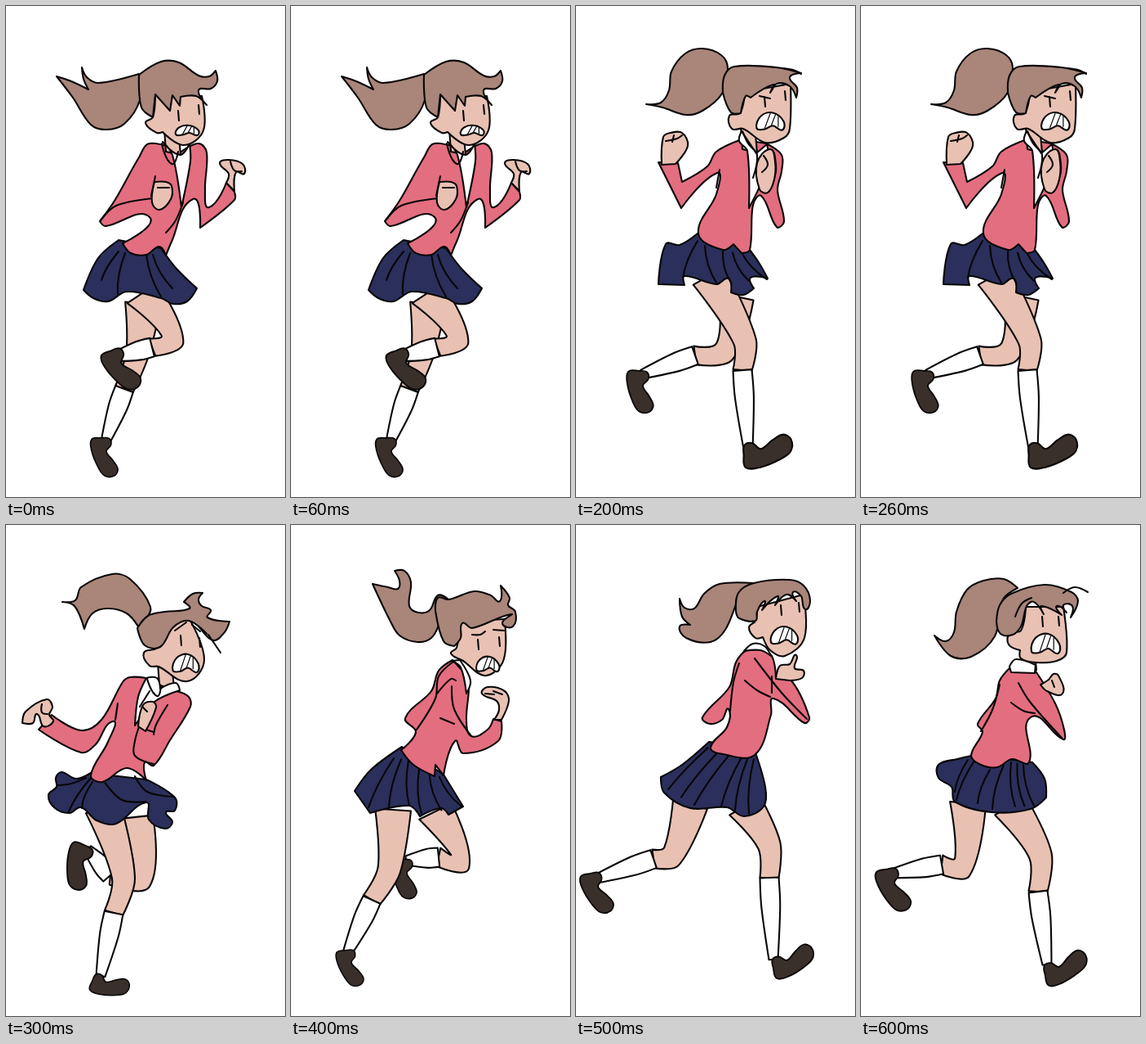
Animation, 342 px wide and 600 px high, one loop 700 ms. Source, as an HTML page with a canvas:

```html
<!DOCTYPE html>
<html lang="en">
<head>
<meta charset="utf-8">
<title>Running girl</title>
<style>
html, body { margin: 0; height: 100%; overflow: hidden; background: #fff; }
canvas { display: block; }
</style>
</head>
<body>
<canvas id="stage" width="342" height="600"></canvas>
<script>
const ctx = document.getElementById('stage').getContext('2d');
const STEP = 100;

// "x,y" pairs; a trailing "!" marks a sharp corner
const parse = text => text.split(' ').map(s => {
  const [x, y] = s.split(',').map(parseFloat);
  return { x, y, sharp: s.endsWith('!') };
});
const dist = (a, b) => Math.hypot(b.x - a.x, b.y - a.y);

function trace(pts, closed) {
  const n = pts.length, at = i => pts[(i + n) % n];
  // Control point beside point i on the way to its neighbour j
  const handle = (i, j) => {
    const p = at(i), a = at(i - 1), b = at(i + 1);
    if (p.sharp || (!closed && (i === 0 || i === n - 1))) return p;
    const k = (j - i) * dist(p, at(j)) / 3 / (dist(a, b) || 1);
    return { x: p.x + (b.x - a.x) * k, y: p.y + (b.y - a.y) * k };
  };
  ctx.beginPath();
  ctx.moveTo(pts[0].x, pts[0].y);
  for (let i = 0; i < (closed ? n : n - 1); i++) {
    const c = handle(i, i + 1), d = handle(i + 1, i), p = at(i + 1);
    ctx.bezierCurveTo(c.x, c.y, d.x, d.y, p.x, p.y);
  }
  if (closed) ctx.closePath();
}

const paint = color => shape => {
  trace(typeof shape === 'string' ? parse(shape) : shape, true);
  ctx.fillStyle = color;
  ctx.fill();
  ctx.stroke();
};
const hair = paint('#a9857a'), skin = paint('#e8c1b3'), red = paint('#e36e7f');
const navy = paint('#2a2f5b'), white = paint('#fff'), brown = paint('#3a302b');

const ink = (...lines) => lines.forEach(text => {
  trace(parse(text), false);
  ctx.stroke();
});

// Outline around a centre line with a width at each joint
function limb(joints, widths) {
  const left = [], right = [];
  joints.forEach((p, i) => {
    const a = joints[i - 1] || p, b = joints[i + 1] || p;
    const d1 = dist(a, p) || 1, d2 = dist(p, b) || 1;
    const dx = (p.x - a.x) / d1 + (b.x - p.x) / d2, dy = (p.y - a.y) / d1 + (b.y - p.y) / d2;
    const k = widths[i] / 2 / Math.hypot(dx, dy), sharp = a === p || b === p;
    left.push({ x: p.x + dy * k, y: p.y - dx * k, sharp });
    right.unshift({ x: p.x - dy * k, y: p.y + dx * k, sharp });
  });
  return left.concat(right);
}

// Hip, knee, sock top, ankle
function leg(text) {
  const [hip, knee, top, ankle] = parse(text);
  const calf = { x: top.x * .65 + ankle.x * .35, y: top.y * .65 + ankle.y * .35 };
  skin(limb([hip, knee, top], [44, 28, 23]));
  white(limb([top, calf, ankle], [23, 23, 11]));
}

function shoe(x, y, deg, size) {
  ctx.save();
  ctx.translate(x, y);
  ctx.rotate(deg * Math.PI / 180);
  ctx.scale(size, size);
  brown('-4,-5 -9,6 -12,21 5,27 32,26 47,21 52,8 45,-1 30,1 13,6 6,-4');
  ctx.restore();
}

const neck = (x, y) => skin([[0, 0], [18, 10], [20, 32], [2, 28]].map(([a, b]) => ({ x: x + a, y: y + b, sharp: true })));

// Pleats running from the waist a-b to the hem c-d
function pleats(count, text) {
  const [a, b, c, d] = parse(text);
  for (let i = 0; i < count; i++) {
    const t = count > 1 ? i / (count - 1) : 0, mix = (p, q) => p + (q - p) * t;
    const x = mix(a.x, b.x), y = mix(a.y, b.y), u = mix(c.x, d.x), v = mix(c.y, d.y);
    ctx.beginPath();
    ctx.moveTo(x, y);
    ctx.quadraticCurveTo((x + u) / 2 - 6, (y + v) / 2 + 2, u, v);
    ctx.stroke();
  }
}

const eyes = (x, y, u, v) => ink(`${x},${y} ${x + 1},${y + 12}`, `${u},${v} ${u + 1},${v + 11}`);

function mouth(x, y, w, h) {
  const put = text => parse(text).map(p => ({ x: x + p.x * w, y: y + p.y * h }));
  white(put('-.5,.4 -.35,-.3 .1,-.5 .5,0 .45,.5 .1,.25 -.2,.45'));
  ctx.lineWidth = 1.2;
  for (const tooth of ['-.2,.4 0,-.45', '.05,.2 .2,-.4', '.3,.3 .3,-.3']) {
    trace(put(tooth), false);
    ctx.stroke();
  }
  ctx.lineWidth = 2.1;
}

function hop() {
  leg('168,364 161,425 145,468 122,532');
  shoe(124, 533, 70, .8);
  leg('167,351 204,407 179,417 132,429');
  shoe(138, 424, 50, .9);
  navy('138,286! 113,308 95,347! 107,357 125,361 148,349 190,357 205,364 222,361 234,345! 209,321 190,296!');
  pleats(2, '138,300 146,302 117,335 137,352');
  pleats(2, '172,303 180,304 190,355 204,345');
  red('176,168 163,185 133,238 115,263! 122,269 176,258 143,290! 153,302 172,304 188,294 196,305! 203,288 229,236 238,271! 280,237 280,227! 270,216! 249,246 244,225 246,179 236,168 215,178!');
  ink('217,240 208,262 196,277', '116,262 135,244 181,235', '183,208 178,232');
  neck(194, 150);
  white('192,166! 204,182 215,246! 226,190 225,168! 213,182');
  ink('191,168 203,193 211,178');
  skin('182,215! 196,215 203,220 202,236 188,249 179,240');
  skin('262,192 273,188 290,193 292,205 282,203 280,226! 270,216! 273,205');
  ink('186,222 200,222', '275,190 280,201 289,202');
  hair('62,86! 80,92 101,102! 95,89 93,75! 99,87 113,94 163,83! 164,115 145,144 123,151 104,145 82,112');
  skin('183,107! 180,136 171,143 185,155 192,154! 218,170 242,152 240,110!');
  hair('163,84! 190,68 212,69 236,85 249,86 257,79! 259,92 251,101 236,103 246,121! 233,110 214,111! 213,122! 204,109! 201,128! 183,108! 180,136! 166,124');
  eyes(211, 128, 236, 121);
  mouth(222, 152, 28, 12);
}

function stretch() {
  leg('180,362 164,414 136,433 92,473');
  shoe(92, 477, 80, .8);
  leg('181,328 230,386 232,417 236,528');
  shoe(238, 531, -20, .9);
  navy('170,258! 155,268 126,273 103,318! 130,329 155,322 194,323 218,342! 228,303! 213,284!');
  pleats(3, '126,273 157,268 128,326 156,322');
  ink('163,272 171,290 202,309 216,338');
  red('217,150! 187,170 177,190 147,210! 146,183! 128,182! 127,235! 166,221 189,200 178,255 173,274 188,287 213,284 227,303! 235,262 253,224 290,230 275,198 270,157! 250,154!');
  ink('192,194 187,214', '268,185 252,187 243,200 262,220 289,229');
  neck(217, 129);
  white('216,149! 232,176 235,229! 242,165 238,150! 231,162');
  ink('221,148 230,165 237,152');
  skin('236,163 245,157 257,160 257,174 247,192 236,193 232,181');
  skin('130,184! 133,163 155,149 168,163 154,167 146,185!');
  ink('236,164 248,165 255,163', '146,155 154,166', '155,150 161,164');
  skin('212,95! 212,113 199,119 204,131 215,133 235,149 268,148 273,138 274,80!');
  hair('99,95! 106,107 116,111 146,72 160,54 180,46 206,63! 187,105! 162,128 120,146 105,135 92,111! 105,115');
  hair('188,106! 184,86 194,71 215,64 245,62 277,75! 270,82 274,94! 266,87 228,98! 232,90 217,98 221,121! 217,125! 212,113! 200,117');
  ink('212,99 220,88 234,84');
  eyes(243, 98, 266, 97);
  mouth(249, 130, 31, 17);
}

function land() {
  leg('196,355 182,422 146,427 81,450');
  shoe(84, 452, 75, .85);
  leg('163,330 207,410 204,445 211,541');
  shoe(212, 540, -20, 1);
  navy('149,278! 127,292 110,291 101,340! 133,341! 133,330 172,340 187,333 190,350! 205,353 218,345! 214,332 235,333! 225,315 213,298!');
  pleats(2, '149,287 158,293 131,332 172,338');
  pleats(3, '180,300 204,303 190,338 234,334');
  red('203,163! 172,178 161,196 130,215! 125,192! 101,191! 129,247! 173,204 172,230 150,278 180,298 193,291! 203,302! 213,298 217,243 227,232 246,270 255,263 247,225 252,202 252,182 233,168!');
  ink('176,200 172,222', '243,180 245,202 238,222', '213,242 219,233');
  neck(202, 147);
  white('203,153! 200,165 210,177 212,247! 236,193 234,169! 221,180!');
  ink('204,153 211,168 222,182 217,210');
  skin('222,192 238,175 244,190 243,212 235,228 225,224');
  skin('105,194! 107,160 116,155 130,155 137,171 122,193!');
  ink('230,183 235,194 228,203', '110,165 124,162 130,158', '120,158 118,166');
  skin('207,105! 201,131 188,134 191,150 205,150 232,167 255,161 262,150 263,95!');
  hair('86,120! 104,118 114,103 117,80 134,58 155,52 178,60 186,76 179,107 155,128 135,133 106,124');
  hair('180,106! 182,85 194,74 245,75 276,82! 262,87 271,100 270,112! 262,98 246,95 238,106! 242,96 214,112! 208,110 202,131! 190,130');
  ink('253,76 266,78 276,83', '225,110 238,113');
  eyes(231, 111, 256, 104);
  mouth(238, 141, 33, 21);
}

function push() {
  leg('158,357 166,432 128,428 100,396');
  shoe(101, 400, 95, .9);
  leg('119,346 144,432 132,474 116,551');
  shoe(113, 553, 5, .75);
  navy('104,303! 86,310 68,302 61,309 62,320 52,330 60,346 78,352 92,345 111,361 135,365 172,339 175,360 195,371 204,363 196,351 207,349 207,333 172,311!');
  pleats(2, '104,309 106,314 77,350 93,346');
  ink('63,318 80,316 98,309', '120,313 142,336 171,338', '158,307 173,326 206,332');
  red('172,187! 152,186 143,192 117,238 92,251 56,232! 40,250! 92,278 110,268 131,240 125,265 104,306 118,314 148,297 172,312! 170,290 181,294 201,263 226,222 224,210 209,203!');
  ink('137,218 134,238', '164,244 158,264 158,282 181,292', '165,248 181,253', '198,220 184,244 181,256');
  neck(186, 168);
  white('172,187! 185,187 189,200! 208,193 213,202! 182,216 158,245! 162,210');
  ink('173,188 185,209 190,196', '176,203 164,222');
  skin('162,246! 168,220 180,216 184,223 171,252!');
  skin('20,242! 24,228 50,213 57,222 53,232 58,240 46,246 38,231 33,242');
  ink('167,222 173,228', '44,219 44,229 51,231');
  skin('190,125! 185,150 169,156 176,172 187,173 222,191 243,165 225,115!');
  hair('69,94! 85,92 92,76 130,60 152,66 177,100 170,118 162,124! 148,108 125,102 106,108 96,127! 84,99');
  hair('161,126! 174,111 195,106 225,102 218,94! 229,84 241,83! 236,91 240,99 251,104 247,113 274,118! 268,131 254,141 236,124 246,133! 224,117 205,125 189,149 170,147');
  ink('248,134 263,156', '221,119 207,129', '228,122 238,130');
  eyes(214, 135, 237, 138);
  mouth(220, 169, 31, 22);
}

function lean() {
  leg('177,350 207,411 181,406 141,410');
  shoe(144, 414, 75, .8);
  leg('125,348 120,422 99,458 69,523');
  shoe(74, 524, 65, .75);
  navy('136,271! 98,299 78,325! 97,352! 145,343 158,356! 184,346 193,354! 211,344! 187,305!');
  pleats(3, '126,285 144,288 95,345 145,343');
  pleats(3, '157,299 182,308 160,353 209,344');
  red('198,165! 181,178 172,203 140,236 153,253 135,275! 150,293 176,307! 177,293! 187,306! 201,264 211,279 254,264 258,240! 248,237! 241,250 221,258 215,238 218,195 212,180!');
  ink('199,167 181,185 177,212 154,250', '183,236 200,243', '197,197 200,225 221,258', '179,206 196,188 202,190');
  skin('249,238! 255,226 252,215 234,206 241,198 262,203 267,215 258,238!');
  ink('238,206 249,207', '248,203 259,207');
  white('197,166! 208,174 215,206! 220,190 207,165!');
  skin('208,118! 203,150 196,157 211,166 237,184 257,172 263,152 262,115!');
  hair('100,72! 119,76 131,78 133,68 127,56! 139,56 147,70 145,99 156,107 170,104 180,86 192,90! 182,120 172,138 155,143 133,135 121,116');
  hair('177,105! 180,89 193,91 225,81 245,86 256,93 257,74! 268,89 266,98 275,106 272,124 259,120 270,109 222,126 210,120 208,138 200,148! 187,142');
  ink('222,134 232,134 238,130', '248,128 261,129');
  eyes(229, 140, 255, 137);
  mouth(241, 170, 27, 18);
}

function leap() {
  leg('140,340 117,405 95,408 26,432');
  shoe(26, 430, 60, .85);
  leg('207,343 237,392 237,431 242,531');
  shoe(246, 533, -30, .87);
  navy('163,265! 130,293 104,308! 108,327 140,346 185,345 206,356 230,344 232,320 217,270!');
  pleats(3, '162,272 187,282 113,323 145,342');
  pleats(3, '203,284 218,286 178,344 212,353');
  red('209,153 196,168 188,198 155,235 164,243 179,238 187,225 185,247 165,272 180,280 219,281 239,232 242,212 280,242 286,235 263,189 245,187! 240,160 225,151');
  ink('200,169 193,192 189,227', '219,163 252,205 283,237', '207,190 222,202 238,210', '240,185 240,205');
  skin('245,188! 250,172 262,170 270,159 268,175 279,178 277,187 262,190!');
  white('206,154! 217,145 231,148 239,160! 226,153');
  skin('222,100! 220,117 212,125 220,138 229,137! 238,153 256,160 280,138 279,85!');
  hair('127,90! 133,101 145,102 157,84 176,72 218,71! 202,85 183,128 165,143 135,138 127,124 140,122! 130,112');
  hair('196,106! 199,83 218,71 262,67 279,74 287,92 281,103 276,87 266,82 270,93! 258,85 244,98! 247,87 228,104! 231,93 222,106 220,117 200,114');
  eyes(251, 98, 273, 95);
  mouth(255, 135, 32, 21);
}

function settle() {
  leg('131,340 124,418 99,415 38,426');
  shoe(40, 425, 60, .9);
  leg('183,343 220,404 217,448 228,537');
  shoe(230, 541, -30, .9);
  navy('140,281! 118,286 95,293 95,309 111,320 115,338 160,351 208,347 227,333! 225,310 210,290!');
  pleats(2, '131,287 139,288 115,326 117,336');
  pleats(2, '158,299 175,293 143,340 161,347');
  pleats(3, '184,290 199,293 189,344 212,343');
  red('183,174! 170,190 165,212 143,243 149,253 135,282 147,293 167,296 185,286 206,290 208,235 248,262 249,250 238,218 213,177!');
  ink('170,195 161,226 147,252', '184,217 199,227 213,230', '193,193 207,216 246,260');
  skin('220,195! 230,189 236,182 242,184 247,206 228,203');
  ink('234,190 237,198');
  neck(195, 145);
  white('182,173! 190,164 214,171! 213,181! 184,180!');
  skin('202,100! 196,129 182,132 181,146 195,153! 196,163 215,168 240,166 252,156 248,100!');
  hair('90,135! 104,142 114,131 117,106 130,79 150,68 175,66 192,77! 174,91 164,136 135,161 110,160');
  hair('166,118! 170,98 184,84 225,73 258,82 266,93 257,113! 259,99 248,98 252,107! 240,99 246,110! 221,99 224,109! 208,94 196,124 186,134 171,133');
  ink('248,83 262,76 278,82', '189,112 197,96 209,89');
  eyes(222, 112, 242, 112);
  mouth(226, 145, 34, 24);
}

const poses = [hop, stretch, land, push, lean, leap, settle];
ctx.lineCap = ctx.lineJoin = 'round';
ctx.strokeStyle = '#080607';
ctx.lineWidth = 2.1;

function draw() {
  ctx.clearRect(0, 0, 342, 600);
  poses[Math.floor(performance.now() / STEP) % poses.length]();
  requestAnimationFrame(draw);
}
draw();
</script>
</body>
</html>
```
